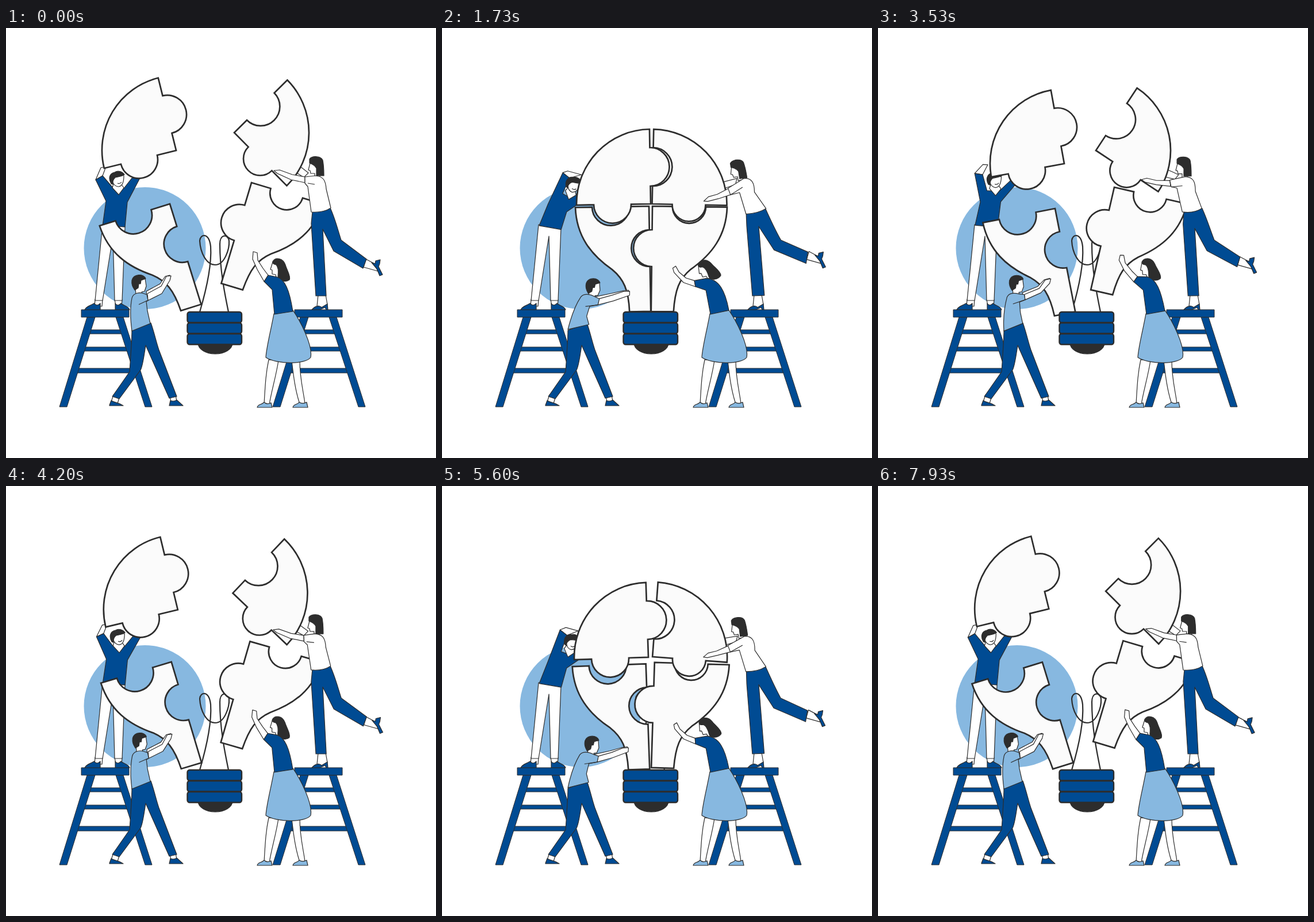
An HTML page that plays this animation: 748x748 px, repeating every 7.99 s.

```html
<!DOCTYPE html>
<html lang="en">
<head>
<meta charset="utf-8">
<title>Building an idea together</title>
<style>
html, body { margin: 0; width: 100%; height: 100%; overflow: hidden; background: #fff }
svg { display: block; width: 100vw; height: 100vh; stroke: #2d2d2d; stroke-width: 1.2; stroke-linejoin: round; fill: #fff }
.b { fill: #004b93 }
.l { fill: #87b8e0 }
.k { fill: #2d2d2d }
.n { fill: none }
.piece { fill: #fbfbfb; stroke-width: 2.7; stroke-linejoin: miter }
</style>
</head>
<body>
<svg viewBox="0 0 748 748">
  <circle class="l" cx="241.5" cy="383" r="106" stroke="none"/>

  <defs>
    <g id="ladder" class="b" stroke-width="1">
      <path d="M146 525H202V532H144ZM135 555H211V562H133ZM122 592H224V600H120Z"/>
      <path d="M141 503H155L106 659H93ZM191 503H204L254 659H242Z"/>
      <path d="M131 490H214V503H131Z"/>
    </g>
  </defs>
  <use href="#ladder"/>
  <use href="#ladder" x="371"/>

  <!-- filament -->
  <path class="n" stroke-width="2.2" d="M337 494C350 450 358 410 356 380C353 355 338 358 337 370C338 390 348 412 364 412C380 412 389 385 388 370C386 358 372 358 372 376C372 420 380 460 387 494"/>

  <!-- man on the ladder -->
  <path d="M155 472L154 484H167L168 472ZM189 472L191 484H201L202 472Z"/>
  <path d="M168 342L155 474L168 474L186 362L189 474L202 474L207 346Z"/>
  <path class="b" d="M137 490C140 483 148 483 153 479C157 483 160 483 164 479V490ZM215 490C212 483 204 483 200 479C196 483 193 483 190 479V490Z"/>
  <path d="M156 264L165 243L174 241L168 257Z" data-d="M172 251L187 237L196 238L186 255Z|M214 253L221 251L247 258L225 262Z"/>
  <path class="b" d="M168 344L174 301L156 264L168 257L186 278L205 279L219 261L233 261L211 303L207 346Z"
    data-d="M169 343L179 303L172 251L186 255L191 284L212 285L236 264L244 271L214 303L208 347Z|M169 344L185 306L214 253L225 262L212 288L218 293L238 291L238 308L217 322L207 351Z"/>
  <g transform="translate(193 263) rotate(0)" data-transform="translate(205 265) rotate(3)|translate(230 273) rotate(25)">
    <path d="M-6 8L-8 15L3 27L12 15L7 8Z"/>
    <path d="M-9 -6C-9 8 -3 13 3 13C10 12 12 4 12 -6L-2 -10Z"/>
    <path class="k" d="M-10 8C-15 0 -14 -10 -4 -12C2 -16 10 -13 13 -8C9 -5 0 -4 -3 -3C-6 0 -8 4 -7 9Z"/>
    <path class="n" d="M1 7Q5 9 8 5"/>
  </g>

  <!-- far arm of the woman on the ladder -->
  <path d="M508 238L526 252L518 260L503 250Z" data-d="M496 246L522 256L516 264L492 260Z|M486 271L512 262L510 273L486 283Z"/>

  <!-- bulb pieces, drawn around the point where they meet -->
  <path class="piece" d="M-128 0H-99A32.5 32.5 0 0 0 -34 0H0V41A32 32 0 0 0 0 105V183H-37C-38 145 -46 126 -66 109C-102 83 -127 50 -128 0Z"/>
  <path class="piece" d="M0 0H35A29 29 0 0 0 93 0H130C129 50 104 83 68 109C48 126 41 145 39 183H0V105A32 32 0 0 1 0 41Z"/>
  <path class="piece" d="M0 -130V-98A33.5 33.5 0 0 1 0 -31V0H-34A32.5 32.5 0 0 1 -99 0H-129A129 130 0 0 1 0 -130Z"/>
  <path class="piece" d="M0 -130V-98A33.5 33.5 0 0 1 0 -31V0H35A29 29 0 0 0 93 0H130A130 130 0 0 0 0 -130Z"/>

  <!-- socket -->
  <ellipse class="k" cx="364" cy="548" rx="30" ry="19"/>
  <g class="b" stroke-width="2.4">
    <rect x="315.500" y="494" width="94.500" height="18.500" rx="4"/>
    <rect x="315.500" y="513" width="94.500" height="18.500" rx="4"/>
    <rect x="315.500" y="532" width="94.500" height="18.500" rx="4"/>
  </g>

  <!-- man on the floor -->
  <path d="M187 638L183 650L194 653L198 640ZM285 640L287 650L297 650L295 638Z"/>
  <path class="b" d="M180 656L183 648C188 652 194 650 204 657H180ZM284 657L286 648C291 650 294 649 297 647L308 657Z"/>
  <path class="b" d="M219 526L252 513C258 530 261 545 266 560L297 641L284 644L243 552C240 570 238 588 234 595L197 645L185 641L215 598C217 570 219 540 219 526Z"/>
  <path d="M244 458L268 445L277 432L285 430L283 437L269 458L245 470Z" data-d="M253 461L280 451L292 440L302 437L300 444L284 457L256 469Z|M268 468L294 463L316 459L326 458L326 464L296 473L270 479Z"/>
  <path d="M246 462L270 449L279 432L287 431L285 439L271 462L247 474Z" data-d="M257 464L283 454L294 440L304 438L302 446L286 461L258 473Z|M274 472L296 466L318 460L328 460L328 467L298 477L272 483Z"/>
  <g transform="translate(232 443) rotate(0)" data-transform="translate(244 444) rotate(2)|translate(265 450) rotate(5)">
    <path d="M-8 0L-6 20L5 21L4 16L9 15L12 6L10 -7L-2 -4Z"/>
    <path class="k" d="M11 -7C8 -16 -10 -16 -13 -4C-14 4 -11 8 -8 13L-2 9L-1 2L2 2L3 -4Z"/>
  </g>
  <path class="l" d="M219 527C216 505 216 485 219 470C221 461 232 459 240 462L245 464L247 474L244 476L246 492L251 514Z"
    data-d="M219 527C218 505 221 485 226 468C230 460 240 461 247 463L257 464L258 473L247 477L248 495L252 514Z|M219 524C225 503 234 480 243 468C248 461 260 463 268 468L275 472L272 483L258 485L252 502L256 516Z"/>
  <path class="n" d="M246 474L231 481" data-d="M258 473L236 480|M272 483L251 485"/>

  <!-- woman on the floor -->
  <path d="M457 577C452 600 451 620 449 654L458 655C462 630 470 605 474 578ZM497 578C500 605 503 630 511 654L520 653C517 630 511 610 511 578Z"/>
  <path class="l" d="M437 660C438 654 444 656 449 651C453 655 457 654 461 652L463 660ZM499 660C500 654 506 656 510 651C515 654 519 653 523 651L525 660Z"/>
  <path class="l" d="M466 497C460 530 453 555 452 573C470 585 520 586 530 573C534 553 513 511 499 491Z"/>
  <path d="M456 430L447 418L438 404L437 391L430 389L429 402L437 420L449 441Z" data-d="M450 433L440 424L428 410L425 397L419 397L417 405L427 424L444 442Z|M438 440L423 436L411 426L405 416L400 420L403 428L420 445L441 451Z"/>
  <g transform="translate(472 416) rotate(0)" data-transform="translate(467 416) rotate(-8)|translate(456 419) rotate(-25)">
    <path d="M-8 -9L-12 4L-9 5L-9 12L-3 13L-2 18L8 20L6 -6Z"/>
    <path class="k" d="M-8 -10C-3 -18 10 -16 14 -4C16 4 24 16 21 22C14 27 2 24 1 16C2 8 2 0 -2 -4C-6 -5 -9 -6 -8 -10Z"/>
  </g>
  <path class="b" d="M467 498L463 455L449 441L456 430L471 433C485 437 493 455 499 493Z"
    data-d="M467 498L461 456L444 442L450 433L468 433C484 437 492 456 499 492Z|M467 498L459 456L441 451L438 440L458 436C482 436 493 458 499 491Z"/>

  <!-- woman on the ladder -->
  <g transform="translate(0 0)" data-transform="translate(13 -14)">
    <path d="M626 402L641 410L647 423L622 416Z"/>
    <path class="b" d="M636 408L642 410L643 405L651 403L650 410L648 415L655 429L650 431L645 419Z"/>
  </g>
  <path d="M543 464L541 484L550 487L559 481L556 464Z"/>
  <path class="b" d="M532 490C538 483 545 482 549 486L559 480L560 490H557L555 486L546 490Z"/>
  <path class="b" d="M533 320L564 313C572 330 577 350 583 369L627 402L621 418L570 388L551 350L557 466L539 466L531 340Z"
    data-d="M529 324L563 315C572 335 580 352 590 369L637 389L634 409L578 386L551 345L561 465L540 466L530 345Z"/>
  <g transform="translate(540 240) rotate(0)" data-transform="translate(530 241) rotate(0)|translate(514 246) rotate(-10)">
    <path d="M-11 -5L-14 7L-11 8L-10 13L-3 13L-3 20L6 20L6 -4Z"/>
    <path class="k" d="M-12 -12C-8 -18 8 -18 11 -10C13 0 13 8 13 17L0 17L0 4C-3 -2 -9 -4 -12 -5Z"/>
  </g>
  <path d="M520 259L498 255L476 247L466 248L472 253L496 264L520 269Z" data-d="M505 267L482 268L466 265L457 268L463 272L482 275L507 277Z|M499 280L480 291L464 296L456 304L463 304L482 299L503 291Z"/>
  <path d="M531 320L525 276L520 270L520 259L538 257C552 258 556 265 557 280L565 313C556 319 545 321 531 320Z"
    data-d="M529 320L519 279L508 278L505 266L534 259C548 260 551 268 551 285L563 314C554 320 543 322 529 320Z|M529 324L518 287L502 291L498 280L524 262C538 260 543 270 543 285L564 314C553 321 543 323 529 324Z"/>
  <path class="n" d="M525 270L537 272" data-d="M508 278L528 275|M503 291L523 277"/>
</svg>
<script>
const LOOP = 7990, CYCLE = 4;
const times = [0, .8, .93, 1.73, 2.13, 2.63, 3.53, CYCLE];
const rests = [0, 4, 5, 7];

// Smooth curve through six values: apart, three closing, joined, one opening
function track([a, b, c, d, e, f], t) {
  const v = [a, b, c, d, e, e, f, a];
  const slope = i => rests.includes(i) ? 0 : (v[i + 1] - v[i - 1]) / (times[i + 1] - times[i - 1]);
  let i = 0;
  while (t >= times[i + 1]) i++;
  const h = times[i + 1] - times[i], u = (t - times[i]) / h, s = u * u * (3 - 2 * u);
  return v[i] + (v[i + 1] - v[i]) * s
    + h * u * (1 - u) * (slope(i) * (1 - u) - slope(i + 1) * u);
}

// x, y and angle of each piece
const poses = [
  [[285, 311, 319, 360, 364, 308], [306, 306, 306, 310, 311, 314], [-17.3, -11.2, -9.1, -1, 0, -11.1]],
  [[427, 402, 395, 366, 364, 411], [269, 282, 286, 310, 311, 277], [16.7, 10.8, 8.9, .7, 0, 12.9]],
  [[296, 323, 331, 363, 364, 324], [213, 235, 244, 306, 311, 236], [-13.9, -10.3, -8.5, -.9, 0, -10.3]],
  [[397, 374, 370, 365.5, 364, 379], [182, 224, 237, 306, 311, 213], [45.3, 29.5, 25, 1.2, 0, 33.4]]
];
const pieces = [...document.querySelectorAll('.piece')];

const MID = .355;
const progress = [0, MID, .46, .95, 1, .28];
const number = /-?[\d.]+/g;
const morphs = ['d', 'transform'].flatMap(name =>
  [...document.querySelectorAll(`[data-${name}]`)].map(el => {
    const shape = el.getAttribute(name);
    const stages = [shape, ...el.dataset[name].split('|')].map(s => s.match(number).map(Number));
    return { el, name, shape, stages };
  }));

function draw() {
  const now = performance.now() % LOOP, beat = now % 200;
  const t = (now - beat + (beat < 130 ? 0 : 130)) / 1000 % CYCLE;

  pieces.forEach((el, i) => {
    const [x, y, angle] = poses[i].map(v => track(v, t));
    el.setAttribute('transform', `translate(${x} ${y}) rotate(${angle})`);
  });

  const p = track(progress, t);
  const line = [1 - p, p];
  const curve = [(p - MID) * (p - 1) / MID, p * (p - 1) / MID / (MID - 1), p * (p - MID) / (1 - MID)];
  for (const { el, name, shape, stages } of morphs) {
    const weights = stages.length > 2 ? curve : line;
    let n = 0;
    el.setAttribute(name, shape.replace(number, () => {
      const value = weights.reduce((sum, w, k) => sum + w * stages[k][n], 0);
      n++;
      return value.toFixed(2);
    }));
  }
  requestAnimationFrame(draw);
}
draw();
</script>
</body>
</html>
```
